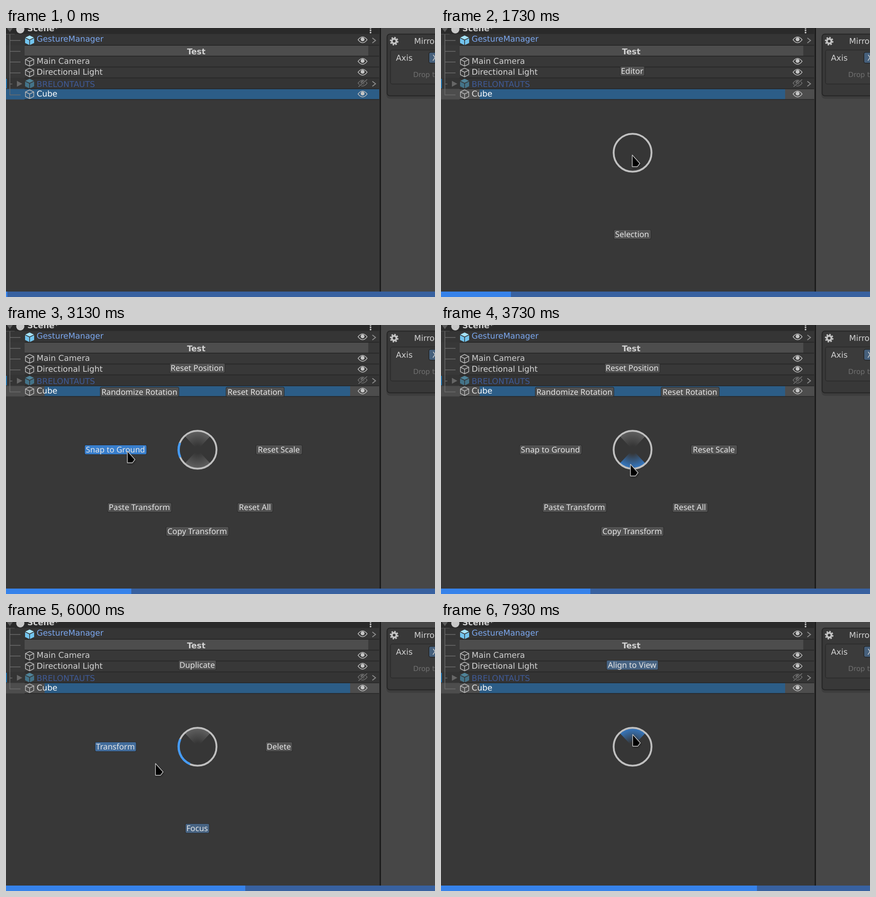
An HTML page for the animation above (8 s loop, 945 by 593 pixels).

```html
<!DOCTYPE html>
<html lang="en">
<head>
<meta charset="utf-8">
<title>Pie menu in a scene hierarchy</title>
<style>
html, body { margin: 0; width: 100%; height: 100%; overflow: hidden; background: #383838; }
svg { display: block; width: 945px; height: 593px; }
text { font: 17.7px "DejaVu Sans", sans-serif; fill: #d2d2d2; white-space: pre; text-rendering: geometricPrecision; }
.bold { font-weight: bold; }
.soft { filter: blur(.6px); }
#labels text { font: 17.6px "Noto Sans", sans-serif; fill: #e6e6e6; text-anchor: middle; }
</style>
</head>
<body>
<svg id="stage" viewBox="0 0 945 593">
  <defs>
    <clipPath id="popup"><rect x="85" y="14" width="673" height="567"/></clipPath>
    <radialGradient id="grey" gradientUnits="userSpaceOnUse" cx="0" cy="0" r="41">
      <stop offset=".2" stop-color="#606060" stop-opacity="0"/><stop offset="1" stop-color="#606060"/>
    </radialGradient>
    <radialGradient id="blue" gradientUnits="userSpaceOnUse" cx="0" cy="0" r="41">
      <stop offset=".2" stop-color="#357ac6" stop-opacity="0"/><stop offset="1" stop-color="#357ac6"/>
    </radialGradient>
    <filter id="shade" x="-50%" y="-50%" width="200%" height="200%">
      <feDropShadow dx="1" dy="2" stdDeviation="2" flood-opacity=".4"/>
    </filter>
  </defs>
  <rect width="945" height="593" fill="#383838"/>
  <g id="list"></g>
  <g id="overlay" clip-path="url(#popup)"><g class="soft" id="snapshot"></g></g>
  <rect x="826" width="119" height="581" fill="#474747"/>
  <rect x="823" width="3" height="581" fill="#1b1b1b"/>
  <g id="inspector">
    <rect x="838" y="14" width="130" height="142" rx="8" fill="#3d3d3d"/>
    <rect x="839.5" y="13.5" width="130" height="136" rx="6" fill="#383838" stroke="#252525" stroke-width="2"/>
    <rect x="847" y="48.5" width="120" height="75" rx="4" fill="#3b3b3b" stroke="#2a2a2a" stroke-width="1.5"/>
    <rect x="931.5" y="53.5" width="40" height="24" rx="4" fill="#46607c" stroke="#222" stroke-width="1.5"/>
    <g fill="none" stroke="#c4c4c4">
      <circle cx="855" cy="29" r="5" stroke-width="4"/>
      <circle cx="855" cy="29" r="8" stroke-width="3" stroke-dasharray="3.4 2.88"/>
    </g>
    <text x="899" y="35">Mirror</text>
    <text x="859" y="72">Axis</text>
    <text x="939" y="72">X</text>
    <text x="897" y="108" style="font-size:15.3px;fill:#707070">Drop t</text>
  </g>
  <g id="pie">
    <g transform="translate(422 275)" fill="none">
      <circle r="42" fill="#363636"/>
      <g id="sectors"></g>
      <circle r="41.7" stroke="#c0c0c0" stroke-width="4"/>
      <path id="arc" stroke="#459bf7" stroke-width="5"/>
    </g>
    <g id="labels"></g>
  </g>
  <path id="cursor" d="M.3 0L17 18.5L11.5 25.7H.3Z" fill="#000" stroke="#c8c8c8" stroke-width="1.4" stroke-linejoin="round" filter="url(#shade)"/>
  <rect y="581" width="945" height="12" fill="#3861a0"/>
  <rect id="progress" y="581" height="12" fill="#3682ea"/>
</svg>
<script>
const $ = id => document.getElementById(id);
const LOOP = 8000, STEP = 1000 / 15, CX = 422, CY = 275, REACH = 180;

// ---- hierarchy ----
const line = (d, color, width = 1.5) => `<path d="${d}" fill="none" stroke="${color}" stroke-width="${width}"/>`;
const box = (x, y, w, h, fill) => `<rect x="${x}" y="${y}" width="${w}" height="${h}" fill="${fill}"/>`;

const wireCube = y => `<g transform="translate(52 ${y})">` +
  line('M0-9.5L9.2-5V5L0 9.5L-9.2 5V-5ZM-9.2-5L0-.5L9.2-5M0-.5V9.5', '#b4b4b4', 1.6) + '</g>';
const solidCube = (y, top, side) => `<g transform="translate(52 ${y})">
  <path d="M0-10.5L9.5-6L0-1.5L-9.5-6Z" fill="${top}"/>
  <path d="M-10-4.5L-.8 0V10.5L-10 6ZM10-4.5L.8 0V10.5L10 6Z" fill="${side}"/></g>`;
const eye = (y, hidden) => `<g transform="translate(785.5 ${y})">` +
  line('M-10 0Q0-13 10 0Q0 13-10 0Z', hidden ? '#707070' : '#bcbcbc', 1.5) +
  `<circle cy="-1" r="4.3" fill="${hidden ? '#707070' : '#c6c6c6'}"/>` +
  (hidden ? line('M-9 8L10-8', '#333', 4) + line('M-9 8L10-8', '#808080', 1.6) : '') + '</g>';
const chevron = y => line(`M807 ${y - 5.5}L814 ${y}L807 ${y + 5.5}`, '#8c8c8c', 2);
const label = (str, y, fill) => `<text x="67.5" y="${y}" style="fill:${fill}">${str}</text>`;

function hierarchy(rowFill, cubeText) {
  let s = box(0, 0, 822, 13.5, '#2a2a2a') + box(0, 14, 822, 24, '#353535') + box(0, 110, 822, 23, '#343434');
  if (rowFill) s += box(0, 134.5, 822, 23, rowFill);
  s += box(41, 39, 757, 22.5, '#4d4d4d');
  for (const y of [38, 62, 86, 110, 134, 157.5]) s += line(`M41 ${y}H822`, '#252525');
  s += line('M8.5 13V148', '#6c6c6c') + line('M8 123.5H14', '#6c6c6c') + line('M0 13.5H19', '#555', 1);
  for (const y of [27.5, 51.5, 75, 99, 147.5]) s += line(`M8 ${y}H32`, '#6c6c6c');
  s += '<path d="M2 0H15L8.5 9Z" fill="#5c5c5c"/><path d="M24 116.5L36 123L24 129.5Z" fill="#666"/>' +
    '<circle cx="31.5" cy="3" r="9" fill="#c8c8c8"/>' + box(0, 112, 2, 21, '#1b74b4');
  for (const y of [0, 5, 10]) s += `<circle cx="803" cy="${y}" r="1.9" fill="#c4c4c4"/>`;
  s += '<text class="bold" x="47" y="7">Scene*</text>' +
    '<text class="bold" x="419" y="58" text-anchor="middle">Test</text>' +
    label('GestureManager', 30, '#7ba7ee') + label('Main Camera', 79, '#cfcfcf') +
    label('Directional Light', 103, '#d6d6d6') + label('BRELONTAUTS', 130, '#3f5a96') +
    label('Cube', 150.5, cubeText);
  s += solidCube(27, '#a5e2fb', '#72c4ee') + solidCube(122.5, '#4f8398', '#447389');
  for (const y of [74.5, 98, 146]) s += wireCube(y);
  for (const y of [26, 73.5, 97.5, 145.5]) s += eye(y);
  return s + eye(121.5, true) + chevron(27.5) + chevron(123);
}
const LISTS = {
  active: hierarchy('#2c5d87', '#fff'),
  none: hierarchy('', '#d6d6d6'),
  passive: hierarchy('#4d4d4d', '#e4e4e4')
};
$('snapshot').innerHTML = box(85, 0, 673, 581, '#383838') + LISTS.active;

// ---- pie menus: label, half-width, direction in degrees; sectors: -1 top, 1 bottom ----
const MENUS = {
  root: { items: [['Editor', 27, -90], ['Selection', 41, 90]], sectors: [] },
  selection: {
    items: [['Duplicate', 41.5, -90], ['Delete', 29.5, 0], ['Focus', 26.5, 90], ['Transform', 45.5, 180]],
    sectors: [-1]
  },
  transform: {
    items: [['Reset Position', 61, -90], ['Reset Rotation', 64, -45], ['Reset Scale', 51, 0], ['Reset All', 39, 45],
      ['Copy Transform', 69, 90], ['Paste Transform', 70.5, 135], ['Snap to Ground', 68.5, 180], ['Randomize Rotation', 86.5, -135]],
    sectors: [-1, 1]
  },
  editor: { items: [['Align to View', 57, -90]], sectors: [-1] }
};

// ---- timeline ----
const SELECTED = [[0, 'active'], [460, 'none'], [1260, 'active'], [1590, 'passive']];
const OPEN = [[0, null], [1590, 'root'], [2000, 'selection'], [3000, 'transform'], [4800, 'selection'],
  [4975, 'root'], [5600, 'selection'], [6390, 'transform'], [6920, 'root'], [7330, 'editor']];
const PATH = [[130, 140, 420], [470, 300, 330], [800, 338, 215], [1000, 346, 193], [1250, 330, 148], [1400, 350, 165],
  [1600, 421, 274], [1730, 421, 278], [2000, 420, 400], [2200, 424, 310], [2530, 402, 371], [2700, 385, 355],
  [3000, 240, 277], [3300, 300, 280], [3600, 410, 295], [3730, 417, 306], [3900, 430, 380], [4050, 545, 330],
  [4200, 560, 190], [4400, 420, 120], [4550, 300, 180], [4700, 340, 290], [4800, 416, 262], [5070, 418, 257],
  [5300, 421, 300], [5550, 421, 430], [5900, 400, 325], [6250, 150, 280], [6380, 114, 278], [6600, 250, 290],
  [6800, 425, 302], [6870, 437, 309], [6935, 437, 306], [7100, 425, 260], [7300, 421, 120], [7600, 421, 130],
  [7800, 421, 216], [7930, 422, 248], [8000, 422, 250]];

const at = (table, t) => table.filter(row => row[0] <= t).pop()[1];

function pointer(t) {
  const i = PATH.findIndex(p => p[0] > t);
  if (i < 1) return PATH[i < 0 ? PATH.length - 1 : 0].slice(1);
  const [a, b] = [PATH[i - 1], PATH[i]], u = (t - a[0]) / (b[0] - a[0]);
  return [a[1] + (b[1] - a[1]) * u, a[2] + (b[2] - a[2]) * u];
}

// What the pointer touches: an item outside the ring, a sector inside it.
function hover(t) {
  const menu = MENUS[at(OPEN, Math.max(0, t))];
  if (!menu) return {};
  const [x, y] = pointer(t), dx = x - CX, dy = y - CY, dist = Math.hypot(dx, dy);
  const angle = Math.atan2(dy, dx) * 180 / Math.PI;
  if (dist < 43) {
    const side = Math.sign(dy);
    return { sector: dist > 10 && menu.sectors.includes(side) ? side : 0 };
  }
  const gap = a => Math.abs((a - angle + 540) % 360 - 180);
  const item = menu.items.reduce((p, q) => gap(q[2]) < gap(p[2]) ? q : p);
  return { item: item[0], angle, span: 360 / Math.max(4, menu.items.length) };
}

const polar = (deg, r) => {
  const a = deg * Math.PI / 180;
  return [r * Math.cos(a), r * Math.sin(a)].map(v => v.toFixed(2)).join(' ');
};
const arcPath = (mid, span, r) => `M${polar(mid - span / 2, r)}A${r} ${r} 0 0 1 ${polar(mid + span / 2, r)}`;

function drawPie(t, name) {
  const menu = MENUS[name], now = hover(t);
  const recent = [0, 26, 52, 78, 104].map(d => hover(t - d));
  const share = test => recent.filter(test).length / recent.length;

  $('sectors').innerHTML = [-1, 1].map(side => {
    const d = arcPath(side * 90, 86, 40) + 'L0 0Z';
    const glow = Math.min(1, 1.6 * share(h => h.sector === side));
    const base = menu.sectors.includes(side) ? 1 - glow : 0;
    return `<path d="${d}" fill="url(#grey)" opacity="${base}"/><path d="${d}" fill="url(#blue)" opacity="${glow}"/>`;
  }).join('');
  $('arc').setAttribute('d', now.item ? arcPath(now.angle, now.span, 41.7) : '');

  $('labels').innerHTML = menu.items.map(([str, half, dir]) => {
    const [x, y] = polar(dir, REACH).split(' ').map(Number), glow = share(h => h.item === str);
    const fill = [[81, 56], [81, 126], [81, 204]].map(([a, b]) => Math.round(a + (b - a) * glow));
    return `<g transform="translate(${CX - .5 + x} ${CY + y})">
      <rect x="${-half}" y="-10.5" width="${2 * half}" height="21" rx="3" fill="rgb(${fill})" stroke="#2b2b2b" stroke-width="1.2"/>
      <text x="-.5" y="6">${str}</text></g>`;
  }).join('');
}

let shownFrame = -1, shownList;
function draw() {
  const frame = Math.floor((performance.now() % LOOP + 3.5) / STEP) % (LOOP / STEP);
  if (frame !== shownFrame) {
    shownFrame = frame;
    const t = frame * STEP, menu = at(OPEN, t), list = at(SELECTED, t);
    if (list !== shownList) $('list').innerHTML = LISTS[shownList = list];
    $('inspector').style.display = list === 'none' ? 'none' : '';
    $('overlay').style.display = $('pie').style.display = menu ? '' : 'none';
    if (menu) drawPie(t, menu);
    $('cursor').style.display = t < 130 ? 'none' : '';
    $('cursor').setAttribute('transform', `translate(${pointer(t).map(Math.round)})`);
    $('progress').setAttribute('width', Math.floor((frame + .5) * 5.825 + .2));
  }
  requestAnimationFrame(draw);
}
draw();
</script>
</body>
</html>
```
